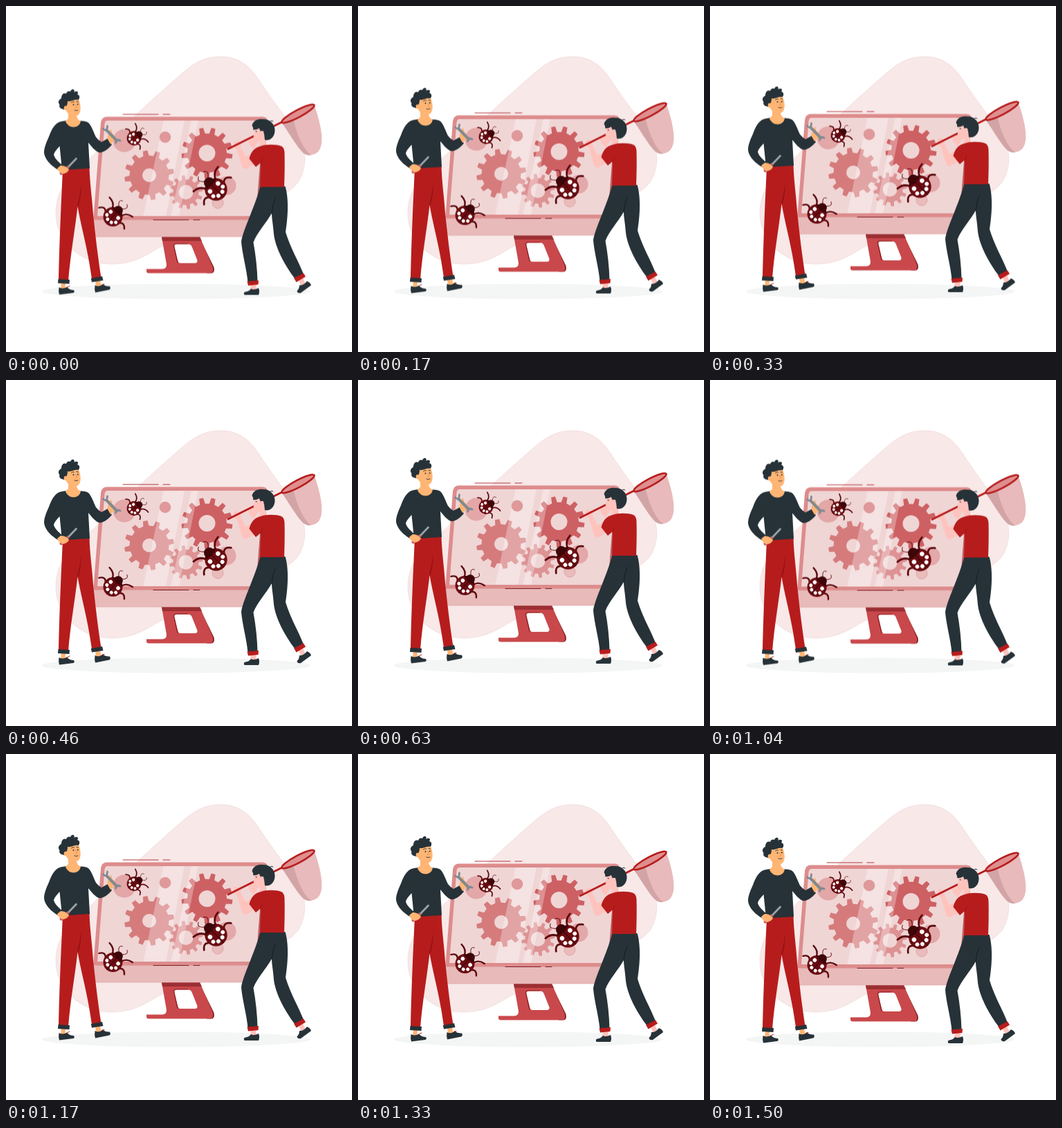
These frames come from a looping animation (500x500 px, 1540 ms). An HTML page:

```html
<!DOCTYPE html>
<html lang="en">
<head>
<meta charset="utf-8">
<title>Bug hunt</title>
<style>
  html, body { margin: 0; width: 100%; height: 100%; overflow: hidden; background: #fff; }
  svg { display: block; width: 100vw; height: 100vh; }
  #scene { animation: float 1540ms linear infinite; }
  @keyframes float {
    0%, 100% { transform: translateY(-.48px); }
    47.4% { transform: translateY(-9.3px); }
    97.4% { transform: translateY(0); }
  }
  .ink { fill: #263238; }
  .red { fill: #b71c1c; }
  .tan { fill: #ffb573; }
  .rose { fill: #ffc3bd; }
  .line { fill: none; stroke-linecap: round; stroke-linejoin: round; }
</style>
</head>
<body>
<svg viewBox="0 0 500 500">
  <defs>
    <clipPath id="screen"><path d="M147 166H367Q372 166 371.500 171L361 304H132L142.500 171Q143 166 147 166Z"/></clipPath>
    <g id="bug">
      <g class="line" stroke="#5a090e">
        <path d="M.6-.6Q1.250-.8 1.300-1.550M.6.6Q1.250.8 1.300 1.550M-.1-.9Q.35-1.300-.2-1.700M-.1.9Q.35 1.300-.2 1.700" stroke-width=".17"/>
        <path d="M1.200-.2Q1.700-.8 1.900-.3M1.200.2Q1.700.8 1.900.3" stroke-width=".06"/>
      </g>
      <circle cx=".85" r=".48" fill="#3d0609"/>
      <circle r="1" fill="#6b0d12"/>
      <path d="M.7-.71Q.35 0 .7.71Q1.300 0 .7-.71Z" fill="#3d0609"/>
      <path d="M-1 0H.6" stroke="#3d0609" stroke-width=".07"/>
      <g fill="#fff">
        <circle cx=".25" cy="-.5" r=".2"/><circle cx=".25" cy=".5" r=".2"/>
        <circle cx="-.25" cy="-.6" r=".18"/><circle cx="-.25" cy=".6" r=".18"/>
        <circle cx="-.55" cy="-.25" r=".18"/><circle cx="-.55" cy=".25" r=".18"/>
      </g>
    </g>
  </defs>

  <path fill="#f8e8e8" stroke="#eed0d0" stroke-width=".5" d="M311 73C333 73 350 84 363 103C385 137 409 166 423 190C432 205 434 222 430 236C424 262 407 268 396 274C340 300 280 320 228 346C205 357 190 373 152 373C108 373 72 340 72 300C72 274 82 257 100 240C150 193 215 130 262 91C277 79 291 73 311 73Z"/>
  <ellipse cx="246" cy="412.500" rx="194" ry="11" fill="#f4f5f5"/>

  <g id="scene">
    <!-- stand -->
    <path fill="#7d1519" d="M279 334L300.500 378Q302 386.500 297 386.500H290L297 380Z"/>
    <path fill="#c9484b" fill-rule="evenodd" d="M225 334H280L299 378Q300 386.500 296 386.500H206Q203 386.500 203 383.500V380.500H226Q232 380 232 374ZM247 344.500H263Q267 344.500 268.500 348L276.500 368Q277 372 273 372H252Q249 372 248 368L243 348Q243 344.500 247 344.500Z"/>
    <path class="line" d="M248 371L242.500 347Q242.500 344 247 344H263" stroke="#8a1a1e" stroke-width="1.200"/>
    <path fill="#9c2f33" d="M225 334H280L283 340H226Z"/>

    <!-- monitor -->
    <path fill="#e8baba" stroke="#dfa0a0" stroke-width=".5" d="M126 308H364L361 330Q360 334 356 334H131Q126 334 126 329Z"/>
    <path fill="#dd8c8c" d="M145 160.500H371Q379 161 378 169L366.500 306Q366 309.500 363 309.500H129Q126 309.500 126.500 306L137 169Q138 161 145 160.500Z"/>
    <path fill="#bb6265" d="M376 195L366.500 306Q366 309 361 309L369 195Z"/>
    <g clip-path="url(#screen)">
      <path fill="#f0d5d5" d="M120 160H380V310H120Z"/>
      <circle cx="171" cy="195" r="16.500" fill="#e3a7a8"/>
      <circle cx="319" cy="260" r="13.500" fill="#e3a8a9"/>
      <circle cx="306" cy="285" r="8" fill="#e9bcbc" stroke="#dc9696" stroke-width=".7"/>
      <g id="gears"></g>
      <path fill="#fff" opacity=".3" d="M229 160H259L230 310H197ZM269 160H279L249 310H237Z"/>
      <circle cx="230" cy="190" r="8.300" fill="#df999a"/>
    </g>
    <path class="line" stroke="#b0343d" stroke-width="1" d="M169 157H220M227 157H237"/>
    <path class="line" stroke="#7b1c22" stroke-width="1" d="M213 309.500H264M271 309.500H280"/>

    <use href="#bug" transform="translate(185 191.500) rotate(-35) scale(10.500)"/>
    <use href="#bug" transform="translate(154.500 305) rotate(-50) scale(14)"/>
    <use href="#bug" transform="translate(303.500 265.500) rotate(-135) scale(16.200)"/>

    <!-- man -->
    <path class="tan" d="M80 399H86L85.500 411H79ZM129 397H136L138 407H130Z"/>
    <path class="ink" d="M76.500 407Q82 410 88 406.500Q92 411 98 411Q100 414 97 415L77 417.500Q75.500 413 76.500 407ZM128.500 404Q134 407 140 402.500Q144 406 150 405.500Q152 409 149 410.500L129 414.500Q127.500 410 128.500 404Z"/>
    <path class="line" stroke="#b71c1c" stroke-width="1" d="M88 407L92 405M139 403L142 402.500"/>
    <path class="red" d="M82 236L120.500 233C121 255 124 275 125.500 296C129 332 133 364 137.500 393L124 395C118 350 109 322 103.500 290C100 322 93 360 90 398H76C77 350 79 300 80.500 270Z"/>
    <path fill="#8f1417" d="M108.500 259Q109 277 104 292L103.300 288Q107 275 108.500 259Z"/>
    <path class="ink" d="M75.500 395L92 396L91.500 402L75 401ZM122.800 394L139 391L140.500 397L124 399.500Z"/>
    <path class="ink" d="M81 167Q86 166 91 166Q93 175 99 175Q106 174 107 166.500Q115 166 119 169C124 174 127 184 130 190Q134 195 138 197L147 192L153 201C147 208 140 213 134 212C127 209 123 202 119 198L121 235L81 237.500L77.500 203C74 207 70 211 69 215C70 220 75 225 81 230L77 238C69 234 56 224 55 212C55 204 60 194 62.500 188C66 179 70 169 81 167Z"/>
    <path class="tan" d="M90 152V163Q87 165 86 167.500Q90 175.500 98 175.500Q106 175 108 167Q102 164 101.500 157Z"/>
    <path class="tan" d="M85 141C89 131 104 131 106 138C108 145 108.500 151 106 156C103 161 95 161 90 156Q84 150 85 141Z"/>
    <path class="ink" d="M84 150C80 149 76 148 77.500 143C74 139 77 135 80 134C80 129 83 125 87 127C88 123 92 123 93 124C95 119 100 120 98.500 125C102 122 106 125 103 128C107 129 107 134 104.500 136C98 135 95 139 89 138C89 142 88 145 86 146Z"/>
    <ellipse class="tan" cx="86" cy="148" rx="2.300" ry="3.200"/>
    <path class="line" stroke="#263238" stroke-width=".9" d="M94.500 140Q96 138 98.500 139M102 138.500L104.500 139M99 151Q102 152.500 104 151"/>
    <circle class="ink" cx="97.500" cy="143" r="1"/><circle class="ink" cx="103.800" cy="142.500" r="1"/>
    <path class="line" stroke="#e08c50" stroke-width=".8" d="M101 142.500L102.500 147L100.500 147.500"/>
    <path class="tan" d="M147 193Q146 188 149 184L151 179Q154 180 153 184L157 188Q158 193 155 196L151 200Z"/>
    <path class="line" stroke="#7f8a90" stroke-width="4" d="M145.500 180L160 195"/>
    <path class="line" stroke="#7f8a90" stroke-width="2.800" d="M140.500 178Q146 183 146.500 174M158.500 198Q159.500 192 165 195"/>
    <path class="line" stroke="#c75d62" stroke-width="5" d="M80 242L89 234"/>
    <path class="line" stroke="#9aa3a8" stroke-width="2.800" d="M91 232L101.500 221"/>
    <path class="tan" d="M79 231Q85 231 88 234L91 237Q89 242 82 243Q76 241 74 235Z"/>

    <!-- woman -->
    <path fill="#e8babb" d="M398.500 169C408 182 418 200 427 210C434 218 444 217 450 212C460 203 458 180 446 145Z"/>
    <path fill="#d3a4a6" d="M398.500 169C408 182 418 200 427 210C431 215 436 217 441 216C430 208 421 188 416 167Z"/>
    <ellipse cx="422" cy="156" rx="26.500" ry="5.200" transform="rotate(-28 422 156)" fill="#df8e8f" stroke="#b71c1c" stroke-width="2.700"/>

    <path class="rose" d="M354 402H362L361 413H353ZM423 397L429 393L433 402L427 406Z"/>
    <path class="ink" d="M354 409Q358 411.500 365 408Q367 413 365 418H344.500Q342.500 414 346 413.500Q351 413 354 409ZM424 404Q430 404.500 435 398Q440 400 441 404L426 415Q421 416 420.500 412Q424 409 424 404Z"/>
    <path class="ink" d="M367.500 261H403.500C408 275 408.500 300 404 327C411 350 423 370 430 388L418 395C401 373 389 348 387 330C386 316 384 307 384 300C376 314 362 329 357.500 342C361 361 363 380 363.500 399L349.500 400C348 381 341 357 340 341C342 325 360 290 367.500 261Z"/>
    <path class="line" stroke="#11191d" stroke-width=".8" d="M384 300Q385 288 389 279"/>
    <path class="red" d="M348.500 398.500L365 397L364.500 403L350 404.500ZM416 393.500L430 386.500L433 391.500L419.500 399.500Z"/>

    <path class="rose" d="M329 200Q329 195 333 196L337 197Q340 200 339 204L346 218L353 215L360 228L348 235.500Q343 237 341 232L334 208Q329 206 329 200Z"/>
    <path class="rose" d="M350 192Q354 190 359 188L364 197L358 207L354 203Q350 199 350 192Z"/>
    <path class="line" stroke="#b71c1c" stroke-width="2.800" d="M321 207L398 168.500"/>
    <path class="rose" d="M359 176Q360 172 366 170L378 178L375 206L365 207L368 196Q361 198 359.500 193L357.500 188L359 185Z"/>
    <path class="ink" d="M355.500 173C357 167 363 163 371 164C380 163 388 170 388.500 179C389 189 382 196 374 194L373 185C369 186 367 180 366 177Q361 180 357 179Q358 177 355.500 173Z"/>
    <ellipse class="rose" cx="370" cy="184" rx="2.600" ry="3.300"/>
    <path class="line" stroke="#263238" stroke-width="1" d="M382 167Q384 165 386 167M361 181.500L362.500 182"/>
    <path class="red" d="M368 203C375 200 391 200 398 203Q402 205 402.500 212C403 230 402.500 247 402 262H367L368 227L361 233L351.500 221C354 211 359 205 368 203Z"/>
    <path class="line" stroke="#8f1417" stroke-width=".8" d="M368 228L371 221"/>
  </g>
</svg>
<script>
  const point = (r, a) => `${(r * Math.cos(a)).toFixed(2)} ${(r * Math.sin(a)).toFixed(2)}`;

  // Toothed ring with a round hole, centred on x, y
  function gear(x, y, outer, body, hole, teeth, turn, fill) {
    const step = 2 * Math.PI / teeth;
    let d = '';
    for (let i = 0; i < teeth; i++) {
      const a = turn + i * step;
      const tooth = [[body, -.28], [outer, -.17], [outer, .17], [body, .28]];
      for (const [r, k] of tooth) d += (d ? 'L' : 'M') + point(r, a + k * step);
    }
    d += `ZM${hole} 0A${hole} ${hole} 0 1 0 ${-hole} 0A${hole} ${hole} 0 1 0 ${hole} 0Z`;
    return `<path transform="translate(${x} ${y})" fill="${fill}" fill-rule="evenodd" d="${d}"/>`;
  }

  document.getElementById('gears').innerHTML =
    gear(207, 245, 36, 28.5, 10, 12, .36, '#d57b7c') +
    gear(260, 269.5, 24.5, 18.5, 10.5, 12, .36, '#dd9293') +
    gear(290.5, 213, 37, 28.5, 12, 13, .13, '#cd6063');
</script>
</body>
</html>
```
